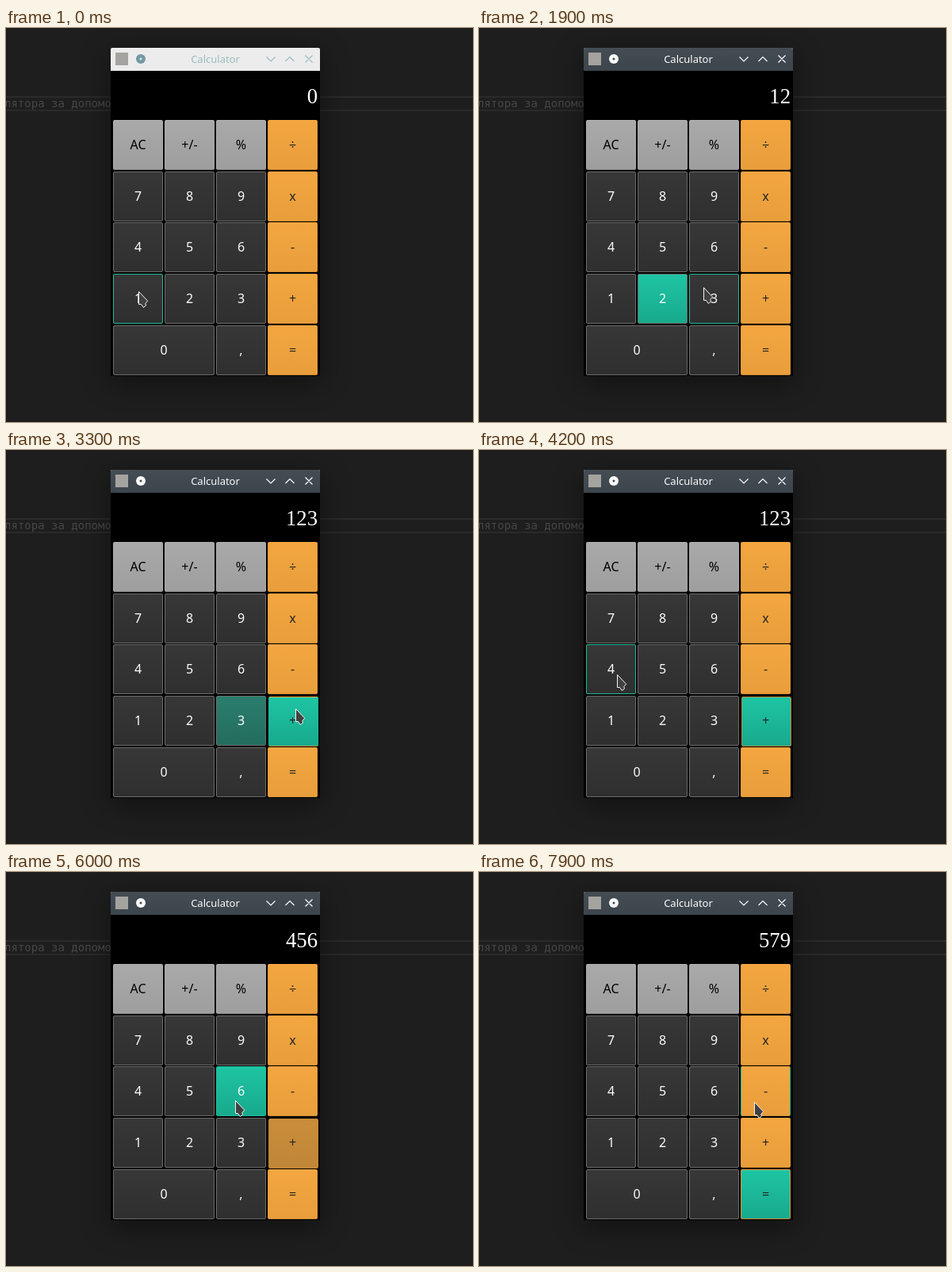
Write an HTML page that moves like this. It is 589 px wide and 497 px high and loops after 8000 ms.

```html
<!DOCTYPE html>
<html lang="en">
<head>
<meta charset="utf-8">
<title>Calculator</title>
<style>
html, body { margin: 0; width: 100%; height: 100%; overflow: hidden; background: #1e1e1e; }
#stage { position: absolute; inset: 0; width: 589px; height: 497px; overflow: hidden; }
#stage * { position: absolute; box-sizing: border-box; }
.code { top: 86px; left: 0; width: 589px; height: 19px; border: solid #2c2a29; border-width: 2px 0; }
.code span { left: -2px; top: -1px; font: 14px/17px "DejaVu Sans Mono", monospace; color: #474747; white-space: pre; }
.window { left: 132px; top: 25px; width: 264px; height: 414px; background: #000;
  border-radius: 2px 2px 0 0; box-shadow: 0 8px 36px rgba(0,0,0,.45); }
.bar { left: 0; top: 0; width: 264px; height: 29px; border-radius: 2px 2px 0 0;
  background: #ececec; color: #9bbcc0; --dot: #7399a2; --hole: #dfe8ea; }
.bar.active { background: linear-gradient(#444d54, #3c454c); color: #fcfcfc; --dot: #fcfcfc; --hole: #3f484f; }
.bar b { left: 0; width: 100%; text-align: center; font: 13px/29px "Noto Sans", sans-serif; }
.bar i { left: 6px; top: 6px; width: 16px; height: 16px; background: #a5a3a0; }
.bar svg { left: 0; top: 0; fill: none; stroke: currentColor; stroke-width: 1.2; }
#display { right: 3px; top: 46px; font: 26.67px/30px "Liberation Serif", serif; color: #fff; }
.key { width: 63px; height: 63px; border: 1px solid #6c6c6c; border-radius: 2px; overflow: hidden;
  background: linear-gradient(#373737, #2f2f2f); color: #fcfcfc; }
.key.wide { width: 128px; }
.key.fn { background: linear-gradient(#a9a9a9, #9e9e9e); border-color: #b2b2b2 #aaa #8d8d8d; color: #000; }
.key.op { background: linear-gradient(#f3a640, #e99e3c); border-color: #f3a640 #e09839 #cf8c34; color: #232627; }
.key.checked { background: linear-gradient(#c98d3a, #c18637); border-color: #c18637; }
.key.hover { border-color: #1abc9c; }
.key.op.hover { border-color: #f3a640 #1abc9c #cf8c34; }
.key i { inset: -1px; background: linear-gradient(#1ec5a4, #18a98c); }
.key b { left: -1px; top: -1px; width: calc(100% + 2px); text-align: center; font: 16px/63px "Noto Sans", sans-serif; }
.key.down { transform: translate(1px, 1px); }
.key.down b { transform: translate(-1px, -1px); }
</style>
</head>
<body>
<div id="stage">
  <div class="code"><span>лятора за допомо</span></div>
  <div class="window"><div id="display">0</div></div>
  <svg id="cursor" width="14" height="23" fill="#414042" stroke="#f4f4f4" stroke-linejoin="round">
    <path d="M.5 .5V16.5H3.5L6.3 20.5L9.5 18L8.8 15.5L11.7 12.3Z"/>
  </svg>
</div>
<script>
const LOOP = 8000, STEP = 100;
const stage = document.getElementById('stage');
const display = document.getElementById('display');
const cursor = document.getElementById('cursor');

// press time, release time, key, display after release
const clicks = [
  [400, 500, '1', '1'], [1200, 1400, '2', '12'], [2100, 2200, '3', '123'], [3300, 3400, '+', '123'],
  [4400, 4500, '4', '4'], [5200, 5300, '5', '45'], [5900, 6000, '6', '456'], [6700, 6900, '=', '579']
];
// time, x, y of the pointer tip
const path = [
  [0, 167, 332], [700, 167, 332], [1000, 224, 328], [1600, 224, 328], [1900, 283, 327],
  [2600, 283, 327], [2900, 352, 300], [3100, 365, 326], [3700, 365, 326], [3800, 322, 303],
  [4200, 174, 283], [4700, 174, 283], [5000, 231, 286], [5400, 231, 286], [5800, 289, 288],
  [6100, 289, 288], [6500, 350, 415], [7100, 350, 415], [7300, 322, 350], [7500, 345, 291],
  [7800, 345, 291], [7900, 347, 290], [8000, 347, 290]
];

function addBar(className) {
  const bar = document.createElement('div');
  bar.className = className;
  bar.innerHTML = `<i></i><b>Calculator</b><svg width="264" height="29">
    <circle cx="38" cy="14" r="6" fill="var(--dot)" stroke="none"/>
    <circle cx="38" cy="14" r="1.5" fill="var(--hole)" stroke="none"/>
    <path d="M196.5 11.5l5.5 5.5l5.5-5.5M220.5 17l5.5-5.5l5.5 5.5M245.5 9.5l9 9m0-9l-9 9"/></svg>`;
  document.querySelector('.window').append(bar);
  return bar;
}
addBar('bar');
const activeBar = addBar('bar active');

const keys = [];
['AC +/- % ÷', '7 8 9 x', '4 5 6 -', '1 2 3 +', '0 _ , ='].forEach((line, row) =>
  line.split(' ').forEach((label, col) => {
    if (label === '_') return;
    const el = document.createElement('div');
    const kind = col === 3 ? 'key op' : row === 0 ? 'key fn' : label === '0' ? 'key wide' : 'key';
    const x = 135 + 65 * col, y = Math.floor(116.3 + 64.75 * row);
    el.style.left = x + 'px';
    el.style.top = y + 'px';
    el.innerHTML = `<i></i><b>${label}</b>`;
    stage.insertBefore(el, cursor);
    keys.push({ el, kind, label, x, y, w: label === '0' ? 128 : 63, glow: el.firstChild });
  }));

function pointerAt(t) {
  const n = path.findIndex(p => p[0] > t);
  const [t0, x0, y0] = path[n - 1], [t1, x1, y1] = path[n];
  const k = (t - t0) / (t1 - t0);
  return [Math.round(x0 + (x1 - x0) * k), Math.round(y0 + (y1 - y0) * k)];
}

function render(t) {
  const [px, py] = pointerAt(t);
  cursor.style.transform = `translate(${px}px, ${py}px)`;
  activeBar.style.opacity = t < 400 ? 0 : t < 500 ? 0.5 : 1;

  const pressed = clicks.filter(c => c[0] <= t);
  const current = pressed.at(-1), previous = pressed.at(-2);
  const released = clicks.filter(c => c[1] <= t).at(-1);
  display.textContent = released ? released[3] : '0';

  for (const key of keys) {
    const focused = current && current[2] === key.label;
    const fading = previous && previous[2] === key.label && t < current[0] + STEP;
    const checked = key.label === '+' && t >= 3300 && t < 6900;
    const down = checked || (focused && t < current[1]);
    const hover = px >= key.x && px < key.x + key.w && py >= key.y && py < key.y + 63;
    key.glow.style.opacity = focused ? 1 : fading ? 0.5 : 0;
    key.el.className = key.kind + (checked ? ' checked' : '') + (down ? ' down' : '') + (hover ? ' hover' : '');
  }
}

const start = performance.now();
function tick() {
  const t = (performance.now() - start) % LOOP;
  render(Math.floor(t / STEP) * STEP);
  requestAnimationFrame(tick);
}
tick();
</script>
</body>
</html>
```
